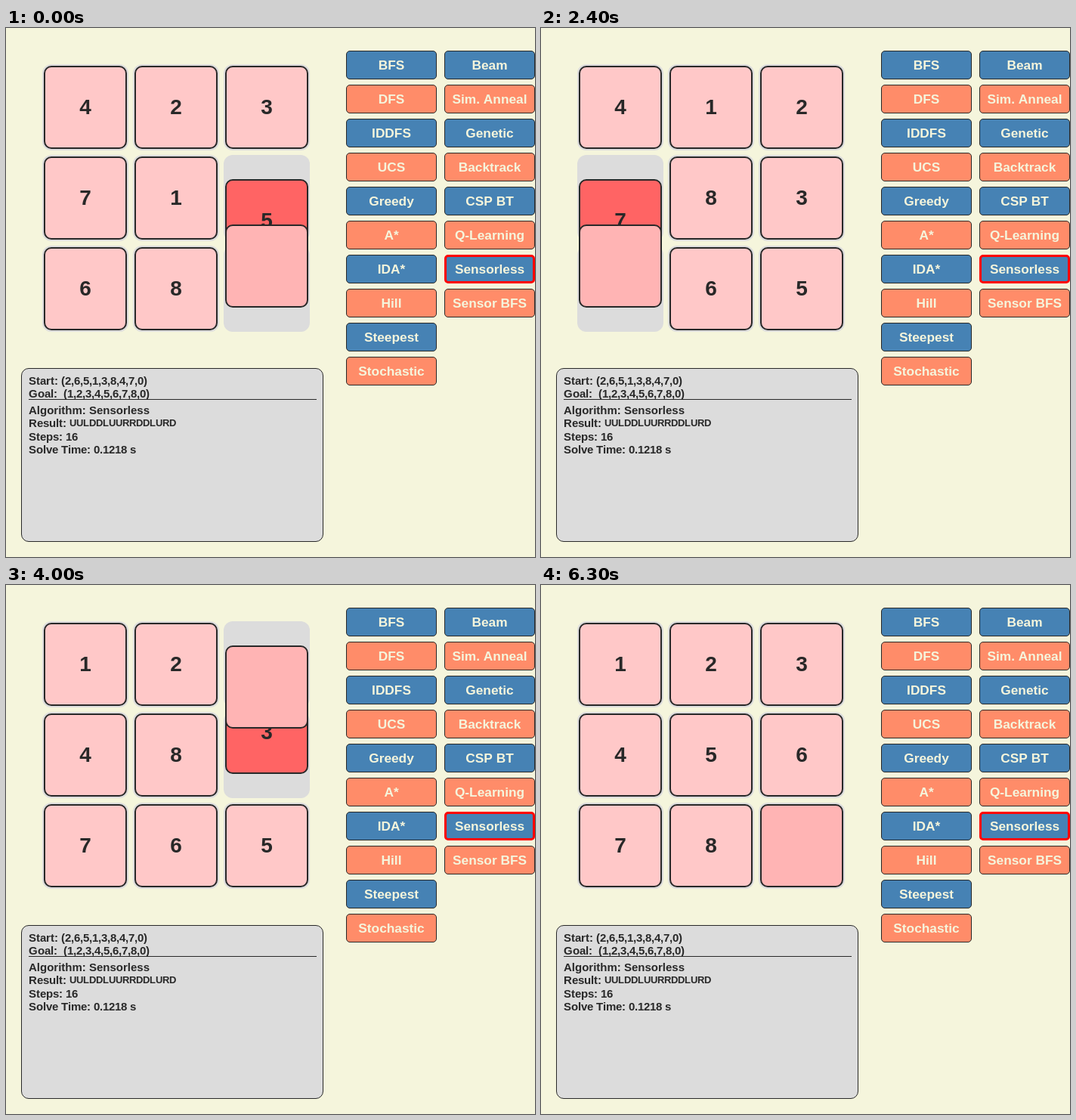
An HTML page with a canvas that plays this animation: 700 px wide and 700 px high, repeating every 6400 ms.

```html
<!DOCTYPE html>
<html lang="en">
<head>
<meta charset="utf-8">
<title>Eight puzzle solver</title>
<style>
  html, body { margin: 0; width: 100%; height: 100%; overflow: hidden; background: #f5f5dc; }
  canvas { display: block; }
</style>
</head>
<body>
<canvas id="stage" width="700" height="700"></canvas>
<script>
const ctx = document.getElementById('stage').getContext('2d');
const INK = '#282828', BEIGE = '#f5f5dc', GREY = '#dcdcdc';
const BLUE = '#4682b4', SALMON = '#ff8c69';
const STEP_MS = 100, STEPS_PER_MOVE = 4;
const START = [4, 2, 3, 7, 1, 5, 6, 8, 0];
const MOVES = 'UULDDLUURRDDLURD';
const OFFSET = { U: -3, D: 3, L: -1, R: 1 };
const BUTTONS = [
  ['BFS', 'DFS', 'IDDFS', 'UCS', 'Greedy', 'A*', 'IDA*', 'Hill', 'Steepest', 'Stochastic'],
  ['Beam', 'Sim. Anneal', 'Genetic', 'Backtrack', 'CSP BT', 'Q-Learning', 'Sensorless', 'Sensor BFS']
];
const SELECTED = 'Sensorless';

// Board before each move, plus the solved one at the end.
const boards = [START];
for (const move of MOVES) {
  const board = boards.at(-1).slice();
  const from = board.indexOf(0), to = from + OFFSET[move];
  [board[from], board[to]] = [board[to], 0];
  boards.push(board);
}

// Rounded box whose border lies inside its edges.
function box(x, y, w, h, radius, fill, line = 0, stroke = INK) {
  ctx.beginPath();
  ctx.roundRect(x + line / 2, y + line / 2, w - line, h - line, radius - line / 2);
  ctx.fillStyle = fill;
  ctx.fill();
  if (line) {
    ctx.lineWidth = line;
    ctx.strokeStyle = stroke;
    ctx.stroke();
  }
}

function text(str, x, y, size, color = INK, align = 'left') {
  ctx.font = `bold ${size}px "Liberation Sans", Arial, sans-serif`;
  ctx.fillStyle = color;
  ctx.textAlign = align;
  ctx.fillText(str, x, y);
}

// Text with whole-pixel glyph advances.
function snappedText(str, x, y, size) {
  for (const char of str) {
    text(char, x, y, size);
    x += Math.round(ctx.measureText(char).width);
  }
}

const cellX = i => 50 + 120 * (i % 3);
const cellY = i => 50 + 120 * Math.floor(i / 3);

function tile(value, x, y, fill = value ? '#ffc8c8' : '#ffb4b4') {
  box(x, y, 110, 110, 10, fill, 2);
  if (value) text(value, x + 55, y + 64, 28, INK, 'center');
}

function drawBoard(step) {
  const index = Math.floor(step / STEPS_PER_MOVE);
  const progress = (step % STEPS_PER_MOVE + 1) / STEPS_PER_MOVE;
  const moving = progress < 1;
  const board = boards[moving ? index : index + 1];
  const from = board.indexOf(0), to = from + OFFSET[MOVES[index]];

  for (let i = 0; i < 9; i++) box(cellX(i) - 2, cellY(i) - 2, 114, 114, 12, GREY);
  board.forEach((value, i) => {
    if (!moving || (i !== from && i !== to)) tile(value, cellX(i), cellY(i));
  });
  if (!moving) return;

  const dx = (cellX(to) - cellX(from)) * progress;
  const dy = (cellY(to) - cellY(from)) * progress;
  tile(board[to], cellX(to) - dx, cellY(to) - dy, '#ff6464');
  tile(0, cellX(from) + dx, cellY(from) + dy);
}

function drawButtons() {
  BUTTONS.forEach((labels, col) => labels.forEach((label, row) => {
    const x = 450 + 130 * col, y = 30 + 45 * row;
    const border = label === SELECTED ? [3, '#ff0000'] : [1, INK];
    box(x, y, 120, 38, 5, row % 2 ? SALMON : BLUE, ...border);
    text(label, x + 60, y + 25, 17.3, BEIGE, 'center');
  }));
}

function drawInfo() {
  box(20, 450, 400, 230, 10, GREY, 1);
  snappedText('Start: (2,6,5,1,3,8,4,7,0)', 30, 472, 15);
  snappedText('Goal:  (1,2,3,4,5,6,7,8,0)', 30, 489, 15);
  ctx.fillStyle = INK;
  ctx.fillRect(30, 491, 381, 1);
  text('Algorithm: ' + SELECTED, 30, 511, 15);
  snappedText('Result:', 30, 528, 15);
  snappedText(MOVES, 84, 527, 13);
  snappedText('Steps: ' + MOVES.length, 30, 546, 15);
  snappedText('Solve Time: 0.1218 s', 30, 563, 15);
}

function draw() {
  const step = Math.floor(performance.now() / STEP_MS) % (MOVES.length * STEPS_PER_MOVE);
  ctx.fillStyle = BEIGE;
  ctx.fillRect(0, 0, 700, 700);
  drawBoard(step);
  drawButtons();
  drawInfo();
  requestAnimationFrame(draw);
}
draw();
</script>
</body>
</html>
```
